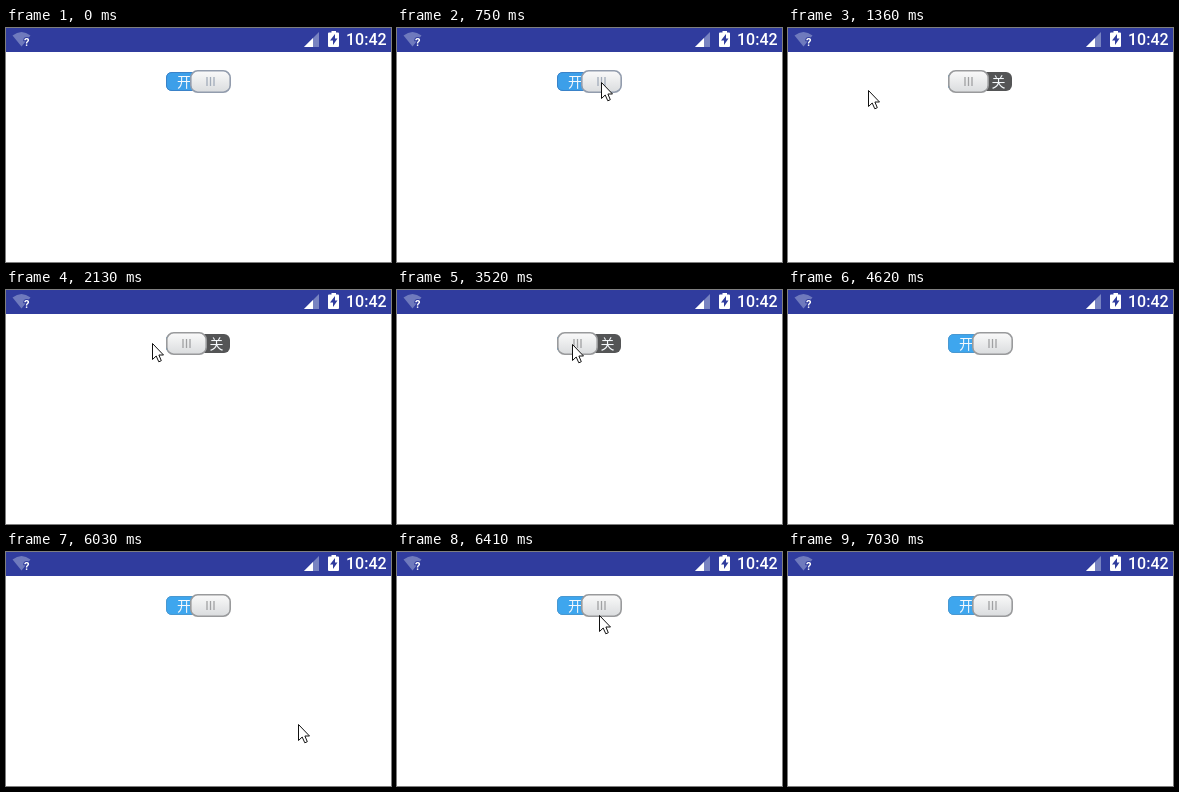
These frames come from a looping animation (385x234 px, 7.18 s). An HTML page:

```html
<!DOCTYPE html>
<html lang="zh">
<head>
<meta charset="utf-8">
<title>Slide switch</title>
<style>
  html, body { margin: 0; width: 100%; height: 100%; overflow: hidden; background: #fff; }
  svg { display: block; width: 100%; height: 100%; }
  .clock { font: 500 16px Roboto, sans-serif; fill: #fff; }
  .label { font: 14px "Noto Sans CJK SC", "Noto Sans CJK", sans-serif; fill: #f4f8fb; }
  .hint { font: 700 11px Roboto, sans-serif; fill: #fff; stroke: #303c9e; stroke-width: 2px; paint-order: stroke; }
</style>
</head>
<body>
<svg viewBox="0 0 385 234">
  <defs>
    <linearGradient id="metal" x2="0" y2="1">
      <stop stop-color="#fafafa"/><stop offset="1" stop-color="#dadcde"/>
    </linearGradient>
    <clipPath id="trackShape"><rect x="160" y="44" width="64" height="19" rx="6"/></clipPath>
  </defs>

  <!-- status bar -->
  <rect width="385" height="24" fill="#303c9e"/>
  <path d="M6.5 7.5Q15.500 0.500 24.500 7.500L15.500 18.500Z" fill="#6f7abd"/>
  <text class="hint" x="18" y="18">?</text>
  <path d="M313 4V19H298Z" fill="#7883c1"/>
  <path d="M307 10V19H298Z" fill="#fff"/>
  <path d="M325.500 3H330V4.500H332Q333 4.500 333 5.500V18Q333 19 332 19H323Q322 19 322 18V5.500Q322 4.500 323 4.500H325.500Z" fill="#fff"/>
  <path d="M329 6L324 12.500H327V17L331.500 10.500H329Z" fill="#303c9e"/>
  <text class="clock" x="340" y="17">10:42</text>

  <!-- switch -->
  <g clip-path="url(#trackShape)">
    <rect id="onSide" x="160" y="44" width="32" height="19"/>
    <rect x="192" y="44" width="32" height="19" fill="#545556"/>
  </g>
  <path id="onEdge" d="M192 44.500H166Q160.500 44.500 160.500 50V57Q160.500 62.500 166 62.500H192" fill="none"/>
  <text class="label" x="171" y="58.500">开</text>
  <text class="label" x="203.500" y="58.500">关</text>
  <g id="thumb">
    <rect id="thumbFace" x="0.800" y="42.800" width="39.400" height="21.400" rx="7" fill="url(#metal)" stroke-width="1.600"/>
    <path id="grip" d="M17 49V58M20.500 49V58M24 49V58" stroke-width="1.300"/>
  </g>

  <path id="cursor" d="M.5 .5V16.500L4.200 13L6.800 18.800L9.300 17.700L6.900 12H11.500Z" fill="#fff" stroke="#111"/>
</svg>
<script>
const LOOP = 7180;
const $ = id => document.getElementById(id);
const clamp = (v, lo, hi) => Math.min(hi, Math.max(lo, v));
const mix = (a, b, u) => a + (b - a) * u;

const easeOut = u => 1 - (1 - u) ** 2;
const easeInOut = u => u * u * (3 - 2 * u);
const linear = u => u;

// Pointer moves: sampled at evenly spaced steps between start and end.
const moves = [
  { start: 130, end: 750, steps: 9, ease: easeOut, path: [[292, 180], [245, 110], [204, 54]] },
  { start: 1050, end: 1520, steps: 7, ease: easeInOut, path: [[202, 54], [120, 58], [36, 67]], drag: true },
  { start: 1750, end: 2210, steps: 7, ease: linear,
    path: [[42, 66], [68, 63], [105, 58], [138, 54], [153, 53], [146, 53], [141, 53]] },
  { start: 2360, end: 2590, steps: 4, ease: easeOut, path: [[146, 53], [174, 54]] },
  { start: 3520, end: 4000, steps: 7, ease: easeInOut, path: [[175, 54], [283, 62]], drag: true },
  { start: 4150, end: 4150, steps: 1, ease: linear, path: [[284, 62]] },
  { start: 4470, end: 4545, steps: 2, ease: linear, path: [[300, 74], [337, 106]] },
  { start: 6030, end: 6720, steps: 10, ease: linear,
    path: [[292, 172], [245, 115], [220, 76], [207, 60], [203, 60],
           [202, 63], [206, 66], [232, 86], [280, 126], [321, 163]] },
  { start: 6790, end: 6950, steps: 3, ease: linear, path: [[326, 176], [339, 215]] }
];
const hidden = [[0, 130], [4620, 6030], [7030, LOOP]];

function along(path, u) {
  const s = u * (path.length - 1);
  const i = Math.min(Math.floor(s), path.length - 2);
  if (i < 0) return path[0];
  return path[i].map((v, k) => Math.round(mix(v, path[i + 1][k], s - i)));
}

function pointerAt(move, t) {
  const gaps = move.steps - 1;
  if (!gaps) return move.path[0];
  const progress = clamp((t - move.start) / (move.end - move.start), 0, 1);
  const step = Math.floor(progress * gaps + 0.06);
  return along(move.path, move.ease(step / gaps));
}

function thumbAt(t) {
  const move = moves.findLast(m => m.drag && t >= m.start);
  return move ? clamp(pointerAt(move, t)[0] - 20, 160, 184) : 184;
}

function draw(t) {
  const move = moves.findLast(m => t >= m.start);
  const visible = move && !hidden.some(([from, to]) => t >= from && t < to);
  $("cursor").style.display = visible ? "" : "none";
  if (visible) $("cursor").setAttribute("transform", `translate(${pointerAt(move, t)})`);

  $("thumb").setAttribute("transform", `translate(${thumbAt(t)})`);
  const cool = t < 1050;
  $("onSide").setAttribute("fill", cool ? "#3c9fe9" : "#3ea6ee");
  $("onEdge").setAttribute("stroke", cool ? "#3a82c8" : "#4a98d0");
  $("thumbFace").setAttribute("stroke", cool ? "#929cad" : "#999a9c");
  $("grip").setAttribute("stroke", cool ? "#a2acba" : "#a0a1a3");
}

function frame() {
  draw(performance.now() % LOOP);
  requestAnimationFrame(frame);
}
frame();
</script>
</body>
</html>
```
